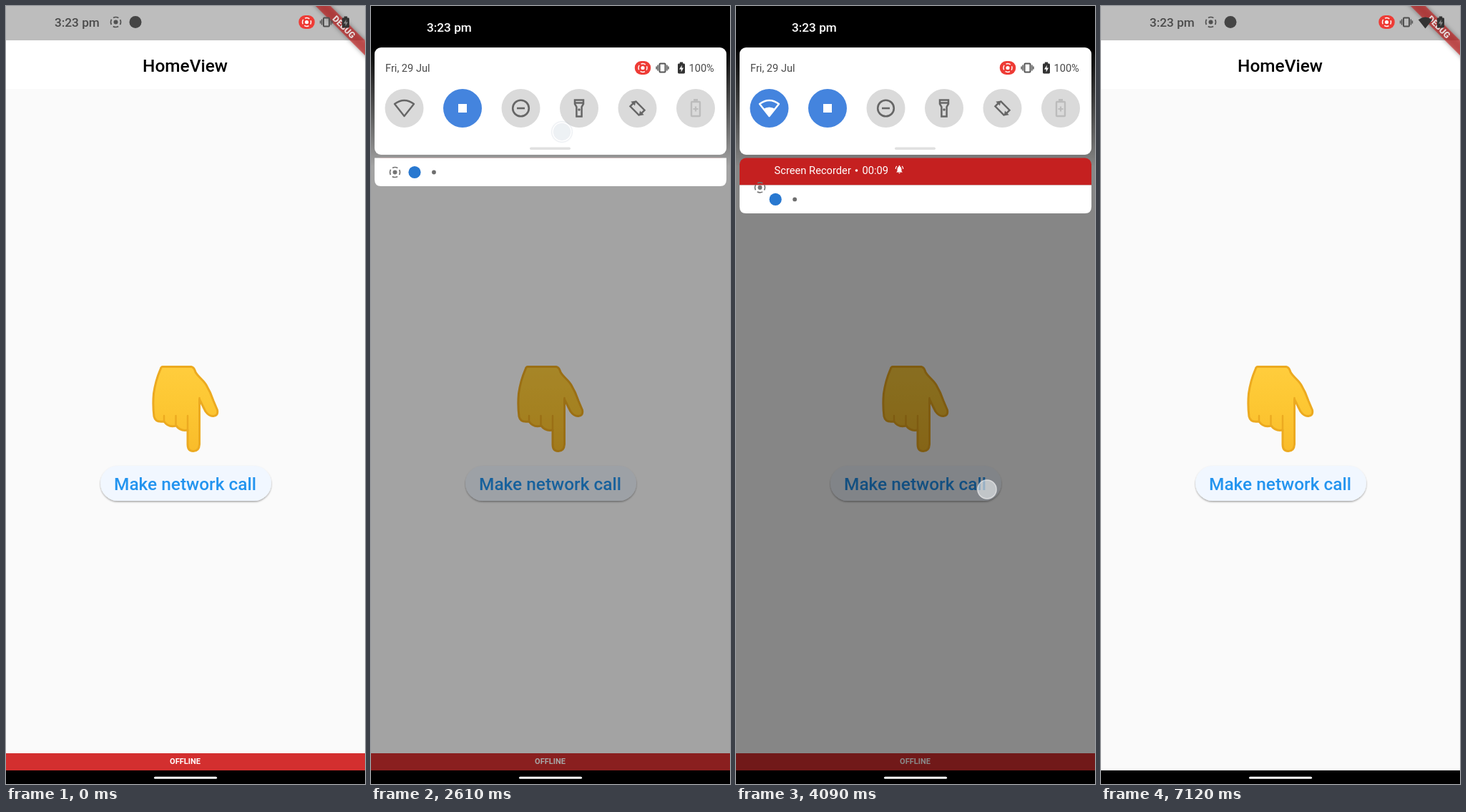
Animation of 502x1088 px, one loop 7.48 s. Source, as an HTML page:

```html
<!DOCTYPE html>
<html lang="en">
<head>
<meta charset="utf-8">
<title>Offline indicator</title>
<style>
html, body { margin: 0; width: 100%; height: 100%; overflow: hidden; background: #000; }
svg { display: block; width: 502px; height: 1088px; }
text { font-family: Roboto, "Noto Sans", sans-serif; white-space: pre; }
.mid { text-anchor: middle; }
.med { font-weight: 500; }
</style>
</head>
<body>
<svg id="stage" viewBox="0 0 502 1088" xmlns="http://www.w3.org/2000/svg"></svg>
<script>
const LOOP = 7480;
const FULL = 760;      // shade height when fully open
const REST = 252;      // shade height with only the shelf below the tiles

// ---- drawing helpers ----
const text = (x, y, size, fill, str, cls = '') =>
  `<text x="${x}" y="${y}" font-size="${size}" fill="${fill}" class="${cls}">${str}</text>`;
const rect = (x, y, w, h, fill, r = 0, more = '') =>
  `<rect x="${x}" y="${y}" width="${w}" height="${h}" rx="${r}" fill="${fill}" ${more}/>`;
const disc = (x, y, r, fill, more = '') =>
  `<circle cx="${x}" cy="${y}" r="${r}" fill="${fill}" ${more}/>`;
const at = (x, y, inner, more = '') => `<g transform="translate(${x} ${y})" ${more}>${inner}</g>`;
const line = (d, color, width, more = '') =>
  `<path d="${d}" fill="none" stroke="${color}" stroke-width="${width}" ${more}/>`;

// ---- icons, centred on 0,0 ----
function record(r, color) {
  const quarter = Math.PI * r / 2;
  return disc(0, 0, r * 0.43, color) +
    disc(0, 0, r, 'none', `stroke="${color}" stroke-width="${r * 0.24}"
      stroke-dasharray="${quarter * 0.7} ${quarter * 0.3}" stroke-dashoffset="${quarter * 0.35}"`);
}
const recordPill = rect(-11.2, -9.5, 22.4, 19, '#ee3b35', 9) + record(6, '#fff');
const vibrate = color => rect(-4, -6, 8, 12, 'none', 1, `stroke="${color}" stroke-width="2"`) +
  line('M-6.4-4V4M6.4-4V4M-8.4-2V2M8.4-2V2', color, 1.5);
const battery = (color, bolt) => rect(-5, -6, 10, 14, color, 1.4) + rect(-2.2, -8, 4.4, 3, color) +
  `<path d="M1-4L-3 2H-.3V6L3 0H.3Z" fill="${bolt}"/>`;
const FAN = 'M-13.5-6Q0-16 13.5-6L0 11Z';
const wifi = (color, on) => line(FAN, color, 2.4, 'stroke-linejoin="round"') +
  (on ? `<path d="M-8.5 1Q0-4 8.5 1L0 11Z" fill="${color}"/>` : '');

const GREY = '#666';
const tileIcons = [
  `<g id="wifiOff">${wifi(GREY)}</g><g id="wifiOn">${wifi('#fff', true)}</g>`,
  rect(-6, -6, 12, 12, '#fff'),
  disc(0, 0, 11.3, 'none', `stroke="${GREY}" stroke-width="2.6"`) + line('M-5.5 0H5.5', GREY, 2.6),
  line('M-6-11.5H6V-6L3.6-2V11.5H-3.6V-2L-6-6ZM-6-7.4H6', GREY, 2.5) + disc(0, 2, 1.8, GREY),
  `<g transform="rotate(45)">${line('M-9-5.2H9V1M9 5.2H-9V-1', GREY, 2.4)}
    <path d="M-13 0H-5L-9-6ZM13 0H5L9 6Z" fill="${GREY}"/></g>`,
  rect(-6, -9, 12, 20, 'none', 1, 'stroke="#bcbcbc" stroke-width="2.4"') +
    rect(-3, -13, 6, 4, '#bcbcbc') + line('M-3.5 1H3.5M0-2.5V4.5', '#bcbcbc', 2.2)
];
const tiles = tileIcons.map((icon, i) =>
  at(46.5 + i * 81.5, 143, disc(0, 0, 27, i === 1 ? '#4484de' : '#dadada', `id="tile${i}"`) + icon)).join('');

const bell = '<path d="M-4.5 3.5L-3 2V-1Q-3-4-.8-4.5V-6H.8V-4.5Q3-4 3-1V2L4.5 3.5ZM-1.4 4.3H1.4Q0 6.5-1.4 4.3Z" fill="#fff"/>' +
  line('M-3.6-5Q-5.3-3.5-5.3-1M3.6-5Q5.3-3.5 5.3-1', '#fff', 1.1);

const hand = `<g stroke="#ecaa20" stroke-width="3" stroke-linejoin="round" stroke-linecap="round">
  <path fill="url(#skin)" d="M219 504.500H259Q263 505 265 512C269 519 276 523 280 530Q286 540 290 552L295.500 565
    Q297 573 290 573.500Q284 574 279 567L270.500 550V613Q270 622.500 262 622.500Q254 622.500 254 613V593
    Q244 595 238 587Q227 590 221 581Q209 583 207 574Q205 558 206.500 542Q209 524 216 508Q217 504.500 219 504.500Z"/>
  <path fill="none" stroke-width="2.500" d="M221 573V581M237.500 573V587M254 573V594M270.500 548V556"/></g>`;

const app = rect(0, 0, 502, 1088, '#fafafa') + rect(0, 48, 502, 68, '#fff') + rect(0, 0, 502, 48, '#bdbdbd') +
  text(250.5, 92, 24.4, '#000', 'HomeView', 'mid med') + hand +
  rect(132, 643, 239, 49, '#f1f7ff', 24.5, 'filter="url(#lift)"') +
  text(250.5, 676.5, 24.4, '#2394ef', 'Make network call', 'mid med') +
  `<g id="offline">${rect(0, 1045, 502, 24, '#d32f2f')}
    ${text(250.5, 1060, 11, '#fff', 'OFFLINE', 'mid" font-weight="700')}</g>
  <g transform="translate(502 0) rotate(45)">
    ${rect(-70, 34.2, 140, 14.6, '#b71c1c', 0, 'fill-opacity=".66" filter="url(#ribbon)"')}
    ${text(0, 45.8, 12.2, '#e6dada', 'DEBUG', 'mid" font-weight="900')}</g>` +
  text(68, 29, 17.2, '#4b4b4b', '3:23 pm', 'med') +
  at(153.5, 22.5, record(7, '#505050')) + disc(181, 22.5, 8.5, '#454545') +
  `<g id="status">${at(420.5, 22.5, recordPill)}${at(448, 22.5, vibrate('#505050'))}</g>` +
  `<path id="wifiStatus" d="${FAN}" transform="translate(453.500 23.500) scale(.72)" fill="#333"/>` +
  at(475, 22.5, battery('#333', '#888'));

const panel = rect(5, 58, 492, 150, '#fff', 9) + text(20, 92, 14.6, '#4a4a4a', 'Fri, 29 Jul') +
  at(380, 86.5, recordPill) + at(407.500, 86.500, vibrate('#555')) + at(434, 86.500, battery('#333', '#fff')) +
  text(444.5, 92, 14.6, '#4a4a4a', '100%') + tiles + rect(222, 197.500, 57, 3.400, '#e0e0e0', 1.7);

const heading = (y, str) => text(24.5, y, 17.3, '#fff', str, 'med');
const cards = rect(5, 212.500, 492, 129.500, '#c52020', 9) +
  `<g id="recCard"><g id="recIcon">${at(33.5, 243, record(8.5, '#fff'))}</g>
    ${text(53.5, 248.5, 14.7, '#fff', 'Screen Recorder')}${disc(168.5, 244, 1.8, '#fff')}
    <text id="clock" x="176.500" y="248.500" font-size="14.700" fill="#fff"></text>
    ${at(228.5, 243, bell)}
    ${text(24.5, 288, 17.2, '#fff', 'Recording screen', 'med')}
    ${text(24.5, 312.5, 17.2, '#fff', 'Tap to stop')}</g>` +
  heading(383, 'Notifications') + rect(5, 406, 492, 129, '#fff', 9) + disc(33.5, 436.5, 10.3, '#2878d0') +
  text(53.5, 442, 14.7, '#3f3f3f', 'Android System') +
  text(24.5, 481, 17.2, '#1c1c1c', 'USB debugging connected', 'med') +
  text(24.5, 505.5, 17.2, '#1c1c1c', 'Tap to turn off USB debugging') +
  heading(577, 'Silent') + rect(5, 600, 492, 61, '#fff', 9) + disc(33.5, 630.5, 10.3, '#757575') +
  text(53.5, 636, 14.7, '#3f3f3f', 'Android System') + disc(165.5, 631.5, 1.7, '#3f3f3f') +
  text(173, 636, 14.7, '#3f3f3f', 'Charging this device via USB') +
  line('M455.5 627L464 635L472.500 627', '#111', 2.6) + heading(703, 'Manage');

const shelf = `<path d="M5 0H497V30Q497 39.500 488 39.500H14Q5 39.500 5 30Z" fill="#fff" id="shelfBox"/>
  <g id="shelfRec">${record(7, '#757575')}</g>
  <g id="shelfBlue">${disc(61, 20, 8.6, '#2878d0')}</g>
  <g id="shelfDot">${disc(88, 20, 2.9, '#6e6e6e')}</g>`;

document.getElementById('stage').innerHTML = `<defs>
  <linearGradient id="skin" x1="0" y1="0" x2="0" y2="1">
    <stop offset="0" stop-color="#ffcd3d"/><stop offset=".4" stop-color="#fdc834"/><stop offset="1" stop-color="#f9bc2a"/></linearGradient>
  <linearGradient id="fade" x1="0" y1="0" x2="0" y2="1">
    <stop offset=".26" stop-color="#000"/><stop offset="1" stop-color="#000" stop-opacity="0"/></linearGradient>
  <filter id="lift" x="-10%" y="-30%" width="120%" height="170%">
    <feDropShadow dx="0" dy="1.500" stdDeviation="1.300" flood-color="#000" flood-opacity=".35"/></filter>
  <filter id="ribbon" x="-10%" y="-80%" width="120%" height="260%">
    <feDropShadow dx="0" dy="0" stdDeviation="3" flood-color="#000" flood-opacity=".6"/></filter>
  <filter id="soft" x="-30%" y="-30%" width="160%" height="160%">
    <feDropShadow dx="0" dy="0" stdDeviation="1.200" flood-color="#7d92ad" flood-opacity=".5"/></filter>
  <clipPath id="cut"><rect id="cutBox" x="0" y="205" width="502" height="0"/></clipPath></defs>
  ${app}
  ${rect(0, 0, 502, 1069, '#000', 0, 'id="scrim"')}
  <g id="shade">
    ${rect(0, 0, 502, 225, 'url(#fade)', 0, 'id="roof"')}
    <g id="sheet">${panel}<g clip-path="url(#cut)">${cards}</g><g id="shelf">${shelf}</g></g>
    <g id="shadeTime">${text(78, 36, 17.2, '#fff', '3:23 pm', 'med')}</g>
  </g>
  ${rect(0, 1069, 502, 19, '#000')}${rect(207, 1077.800, 88, 3, '#fff', 1.5)}
  <g id="touch">${disc(0, 0, 13, '#f4f6f8', 'fill-opacity=".78" stroke="#fff" stroke-width="1.500" filter="url(#soft)"')}</g>`;

// ---- motion ----
const el = {};
document.querySelectorAll('#stage [id]').forEach(n => { el[n.id] = n; });
const set = (id, name, value) => el[id].setAttribute(name, value);
const show = (id, on) => set(id, 'opacity', +on);
const move = (id, x, y) => set(id, 'transform', `translate(${x} ${y})`);
const clamp = v => Math.max(0, Math.min(1, v));
const span = (t, a, b) => clamp((t - a) / (b - a));
const ease = v => v * v * (3 - 2 * v);

// value along [time, value] steps, column c
function track(steps, t, c = 1) {
  const last = steps[steps.length - 1];
  if (t >= last[0]) return last[c];
  let i = 0;
  while (i < steps.length - 2 && t >= steps[i + 1][0]) i++;
  const [a, b] = [steps[i], steps[i + 1]];
  return a[c] + (b[c] - a[c]) * span(t, a[0], b[0]);
}

const height = [[2240, 0], [2330, 70], [2470, 210], [2550, REST], [2620, REST], [2740, 390], [2850, 610],
  [2970, FULL], [3780, FULL], [3900, 640], [4000, 450], [4090, 291], [4180, 190], [4300, 70], [4430, 0]];
// each touch: [time, x, y]
const touches = [
  [[2240, 263, 38], [2430, 265, 92], [2610, 267, 175], [2740, 269, 300], [2840, 270, 400]],
  [[3370, 47, 146], [3520, 47, 146]],
  [[3770, 343, 920], [3930, 347, 820], [4090, 351, 677], [4200, 354, 560]]
];

function drawShade(t) {
  const h = track(height, t);
  set('shade', 'display', h > 0 ? 'inline' : 'none');
  set('scrim', 'opacity', h < REST ? 0.35 * h / REST : Math.min(0.86, 0.35 + (h - REST) * 0.0031));
  const near = clamp(h / 200);
  show('roof', near);
  show('shadeTime', near);
  move('sheet', 0, Math.min(0, h - REST));

  const body = Math.max(h, REST);
  const top = body - 39.5;
  const lift = span(body, REST, 291);
  const tucked = body < 661;
  set('cutBox', 'height', tucked ? Math.max(0, top - 205) : 900);
  show('shelf', tucked);
  move('shelf', 0, top);
  move('shelfRec', 33.5, 20 - 17 * lift);
  show('shelfRec', 1 - span(body, 291, 320));
  move('shelfBlue', -6 * lift, 0);
  show('shelfBlue', 1 - span(body, 430, 470));
  move('shelfDot', -6 * lift, 0);
  move('recCard', 0, -14 * (1 - span(body, 291, 391)));
  show('recIcon', span(body, 291, 330));
  el.clock.textContent = t < 3600 ? '00:08' : '00:09';

  const on = t >= 3450;
  show('wifiOn', on);
  show('wifiOff', !on);
  set('tile0', 'fill', on ? '#4484de' : '#dadada');
}

function drawTouch(t) {
  const path = touches.find(p => t >= p[0][0] && t < p[p.length - 1][0]);
  if (!path) return show('touch', 0);
  const end = path[path.length - 1][0];
  move('touch', track(path, t, 1), track(path, t, 2));
  show('touch', (t > 3900 && t < 4200 ? 0.7 : 1) * span(t, end, end - 80));
}

function draw() {
  const t = performance.now() % LOOP;
  drawShade(t);
  drawTouch(t);
  const joined = ease(span(t, 6120, 6420));
  move('status', -21 * joined, 0);
  show('wifiStatus', joined);
  move('offline', 0, 25 * ease(span(t, 6820, 7120)));
  requestAnimationFrame(draw);
}
draw();
</script>
</body>
</html>
```
